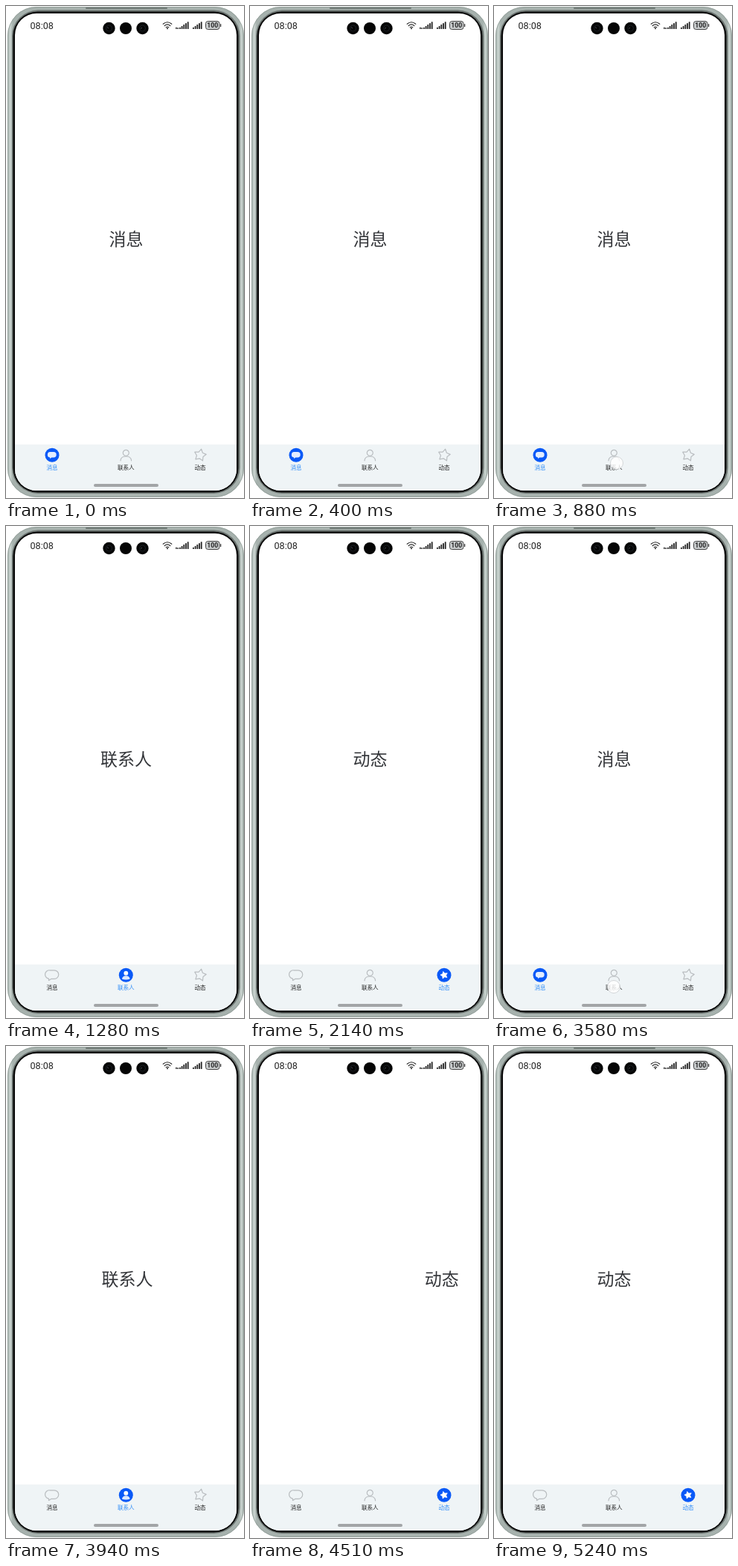
Recreate the animation shown at these times as an HTML page. Size 320 by 662 pixels, loop 5320 ms.

```html
<!DOCTYPE html>
<html lang="zh-CN">
<head>
<meta charset="utf-8">
<title>Tabs</title>
<style>
html, body { margin: 0; width: 100%; height: 100%; overflow: hidden; background: #fff; }
svg { display: block; width: 320px; height: 662px; }
text { font-family: "Noto Sans CJK SC", "Noto Sans CJK", "Noto Sans SC", sans-serif; text-anchor: middle; }
.clock { font: 12.6px Roboto, sans-serif; text-anchor: start; fill: #222; }
.level { font: bold 8.6px Roboto, sans-serif; fill: #222; }
.page { font-size: 23px; fill: #34363a; }
.label { font-size: 7.6px; font-weight: 500; fill: #222; }
.on .label { fill: #2f8cf8; font-weight: 400; }
.line { fill: none; stroke: #b9bdc0; stroke-width: 1.2; stroke-linecap: round; stroke-linejoin: round; }
.disc { fill: #0a59f7; }
.solid, .on .line { display: none; }
.on .solid { display: inline; }
</style>
</head>
<body>
<svg viewBox="0 0 320 662">
  <defs>
    <linearGradient id="metal" x1="0" x2="1" y1="0" y2="0">
      <stop offset="0" stop-color="#a3afaa"/>
      <stop offset=".012" stop-color="#cbd5d1"/>
      <stop offset=".022" stop-color="#a6b1ad"/>
      <stop offset=".5" stop-color="#aab4b0"/>
      <stop offset=".978" stop-color="#a6b1ad"/>
      <stop offset=".99" stop-color="#cbd5d1"/>
      <stop offset="1" stop-color="#98a49f"/>
    </linearGradient>
    <clipPath id="glass"><rect x="12" y="10" width="298" height="642" rx="29"/></clipPath>
  </defs>

  <rect x="2" y="1" width="318" height="660" rx="39" fill="url(#metal)"/>
  <rect x="2.5" y="1.5" width="317" height="659" rx="38.5" fill="none" stroke="#8d9a95" stroke-width=".8"/>
  <rect x="107" y="2" width="110" height="2" rx="1" fill="#6f7975"/>
  <rect x="8" y="5.5" width="306.500" height="650.500" rx="35" fill="#6a726f"/>
  <rect x="9.500" y="7.500" width="303" height="647" rx="33" fill="#080808"/>

  <g clip-path="url(#glass)">
    <rect x="12" y="10" width="298" height="642" fill="#fff"/>
    <g id="pages"></g>
    <rect x="12" y="590" width="298" height="62" fill="#eff4f6"/>
    <g id="tabs"></g>
    <circle id="dot" r="8.500" fill="#fff" fill-opacity=".82" stroke="#c4c8ca" stroke-width=".7"/>
    <rect x="118" y="643" width="87" height="4" rx="2" fill="#a2a5a7"/>
  </g>

  <text class="clock" x="32.500" y="31">08:08</text>
  <g fill="#050505">
    <circle cx="138.500" cy="30" r="8.200"/>
    <circle cx="161" cy="30" r="8"/>
    <circle cx="183.500" cy="30" r="8.200"/>
  </g>
  <g fill="none" stroke="#4a4f55" stroke-width=".9">
    <circle cx="138.500" cy="30" r="4" stroke="#1f2328"/>
    <circle cx="183.500" cy="30" r="4" stroke="#1f2328"/>
    <path d="M136 28.500l2 1.500M181 30.500l2 -1.500"/>
  </g>
  <g fill="none" stroke="#222" stroke-width="1.200" stroke-linecap="round">
    <path d="M211.200 24.200Q217 19.300 222.800 24.200M213.200 26.500Q217 23.300 220.800 26.500M215.200 28.700Q217 27.300 218.800 28.700"/>
  </g>
  <circle cx="217" cy="30.200" r="1" fill="#222"/>
  <g id="bars" fill="#222"></g>
  <rect x="268.500" y="20.500" width="18.500" height="11" rx="3" fill="#c9cccd" stroke="#444" stroke-width="1"/>
  <rect x="288" y="24" width="1.300" height="4" rx=".6" fill="#444"/>
  <text class="level" x="277.700" y="29.100">100</text>
</svg>
<script>
const LOOP = 5320, WIDTH = 298, MID = 161.5;
const SLIDE_DELAY = 40, SLIDE = 360, PRESS = 80;
const names = ['消息', '联系人', '动态'];
const centers = [62, 161.3, 261];
// start time, tab chosen, finger position
const taps = [
  [880, 1, 165, 615],
  [1740, 2, 262, 617],
  [2720, 0, 62, 617],
  [3580, 1, 161, 620],
  [4350, 2, 262, 617]
];
const $ = id => document.getElementById(id);

function star(r, inner, turn) {
  const pts = [];
  for (let i = 0; i < 10; i++) {
    const a = turn + i * Math.PI / 5 - Math.PI / 2, d = i % 2 ? inner : r;
    pts.push((d * Math.cos(a)).toFixed(2) + ' ' + (d * Math.sin(a)).toFixed(2));
  }
  return 'M' + pts.join('L') + 'Z';
}

const bubble = 'M-3 -6.500H3A5.600 5.600 0 0 1 3 5H-1L-4.500 7.200V4.800A5.600 5.600 0 0 1 -3 -6.500Z';
const icons = [
  { line: `<path d="${bubble}"/>`,
    solid: `<path d="${bubble}" transform="scale(.65)" fill="#e3edff"/>` },
  { line: '<circle cy="-3" r="4"/><path d="M-7.300 7.500C-7 -0.500 7 -0.500 7.300 7.500"/>',
    solid: '<circle cy="-2.600" r="2.900" fill="#fff"/><path d="M-5.300 5.300C-5 -.5 5 -.5 5.300 5.300Q0 7 -5.300 5.300Z" fill="#dce8ff"/>' },
  { line: `<path d="${star(8.3, 4.6, .2)}"/>`,
    solid: `<path d="${star(5, 2.6, -.25)}" fill="#fff" stroke="#fff" stroke-width=".8" stroke-linejoin="round"/>` }
];

$('pages').innerHTML = names.map((n, i) =>
  `<text class="page" x="${MID + i * WIDTH}" y="322.300">${n}</text>`).join('');
$('tabs').innerHTML = names.map((n, i) => `<g>
  <g transform="translate(${centers[i]} 604.300)">
    <g class="line">${icons[i].line}</g>
    <g class="solid"><circle class="disc" r="9.500"/>${icons[i].solid}</g>
  </g>
  <text class="label" x="${centers[i]}" y="623.600">${n}</text></g>`).join('');

function bars(x, count, step, base) {
  let out = '';
  for (let i = 0; i < count; i++) {
    const h = base + i * 1.9;
    out += `<rect x="${x + i * step}" y="${31 - h}" width="1.800" height="${h}" rx=".4"/>`;
  }
  return out;
}
$('bars').innerHTML = bars(233, 5, 2.7, 2.2) + bars(251, 5, 2.7, 2.2) +
  '<rect x="228.200" y="28.600" width="1.400" height="2.400"/><rect x="230.400" y="29.200" width="1.500" height="1.800"/>';

// cubic-bezier(.2, 0, .1, 1)
function ease(x) {
  if (x <= 0) return 0;
  if (x >= 1) return 1;
  let lo = 0, hi = 1;
  for (let i = 0; i < 24; i++) {
    const s = (lo + hi) / 2, q = 1 - s;
    if (.6 * s * q * q + .3 * s * s * q + s * s * s < x) lo = s; else hi = s;
  }
  return lo * lo * (3 - 2 * lo);
}

const tabs = [...$('tabs').children];

function draw(t) {
  let active = 0, pos = 0, finger = null;
  for (const [start, tab, x, y] of taps) {
    if (t < start) break;
    if (t < start + PRESS) finger = [x, y];
    pos += (tab - pos) * ease((t - start - SLIDE_DELAY) / SLIDE);
    if (t >= start + SLIDE_DELAY) active = tab;
  }
  $('pages').setAttribute('transform', `translate(${(-pos * WIDTH).toFixed(2)} 0)`);
  tabs.forEach((g, i) => g.setAttribute('class', i === active ? 'on' : ''));
  $('dot').style.display = finger ? '' : 'none';
  if (finger) $('dot').setAttribute('transform', `translate(${finger})`);
}

const origin = performance.now();
function tick() {
  draw((performance.now() - origin) % LOOP);
  requestAnimationFrame(tick);
}
tick();
</script>
</body>
</html>
```
